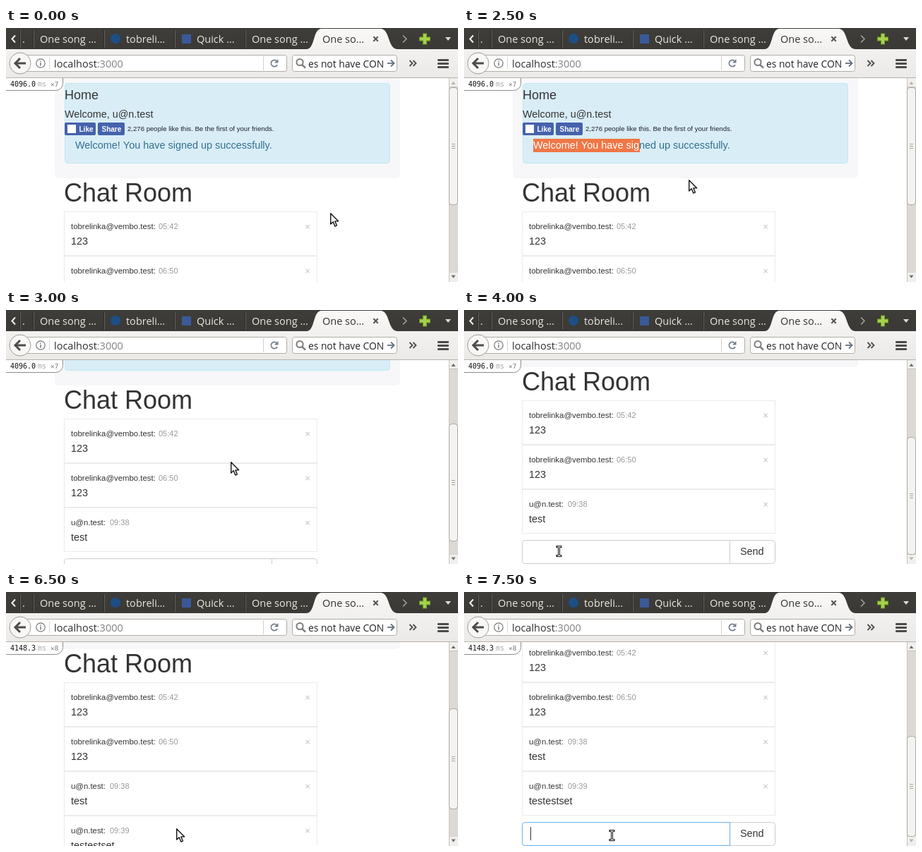
Animation of 640 by 360 pixels, one loop 8 s. Source, as an HTML page with a canvas:

```html
<!DOCTYPE html>
<html lang="en">
<head>
<meta charset="utf-8">
<title>Chat room</title>
<style>
html, body { margin: 0; width: 100%; height: 100%; overflow: hidden; background: #fff; }
canvas { display: block; width: 640px; height: 360px; }
</style>
</head>
<body>
<canvas id="stage" width="640" height="360"></canvas>
<script>
const c = document.getElementById('stage').getContext('2d');
const LOOP = 8000;
const STEP = 250;
const UI = '"Open Sans", "Noto Sans", sans-serif';
const SANS = '"Liberation Sans", Arial, sans-serif';
const MONO = '"DejaVu Sans Mono", monospace';
const USER = 'u@n.test';
const FRIEND = 'tobrelinka@vembo.test';
const DRAFT = 'testestset';
const NOTICE = 'Welcome! You have signed up successfully.';
const MESSAGES = [
  [FRIEND, '05:42', '123'],
  [FRIEND, '06:50', '123'],
  [USER, '09:38', 'test'],
  [USER, '09:39', DRAFT]
];

// Each entry overrides part of the state from its time on.
const TIMELINE = [
  [0, { kind: 'arrow', x: 459, y: 262, scroll: 0, sel: 0, sent: false, focus: false, caret: false, typed: 0, button: '#fff' }],
  [250, { x: 400, y: 235 }],
  [500, { x: 250, y: 170 }],
  [750, { x: 41, y: 93 }],
  [1000, { x: 60, y: 148 }],
  [1250, { kind: 'beam', x: 102, y: 166 }],
  [1500, { x: 249, sel: 151 }],
  [1750, { kind: 'arrow', x: 350, y: 113 }],
  [2250, { x: 335, y: 170 }],
  [2500, { x: 318, y: 215 }],
  [2750, { scroll: 53 }],
  [3000, { scroll: 106 }],
  [3250, { scroll: 132, y: 220 }],
  [3500, { x: 250, y: 268 }],
  [3750, { x: 165, y: 318 }],
  [4000, { kind: 'beam', x: 134, y: 342 }],
  [4250, { focus: true, caret: true }],
  [4500, { typed: 1 }],
  [4750, { typed: 5 }],
  [5000, { typed: 10 }],
  [5250, { x: 300, y: 346 }],
  [5500, { kind: 'hand', x: 396, y: 344, button: '#e6e6e6' }],
  [5750, { focus: false, caret: false, button: '#d4d4d4' }],
  [6000, { kind: 'arrow', x: 391, y: 341, sent: true, typed: 0, button: '#fff' }],
  [6250, { x: 305, y: 338 }],
  [6500, { x: 241, y: 335 }],
  [6750, { scroll: 164 }],
  [7000, { kind: 'beam', x: 236, y: 342, scroll: 195 }],
  [7250, { x: 209, y: 345, focus: true }],
  [7500, { caret: true }]
];

function stateAt(t) {
  return Object.assign({}, ...TIMELINE.filter(k => k[0] <= t).map(k => k[1]));
}

function text(str, x, y, size, color, family = SANS, weight = '') {
  c.font = `${weight} ${size}px ${family}`;
  c.fillStyle = color;
  c.fillText(str, x, y);
}

function box(x, y, w, h, r, fill, stroke) {
  c.beginPath();
  c.roundRect(x, y, w, h, r);
  if (fill) { c.fillStyle = fill; c.fill(); }
  if (stroke) { c.strokeStyle = stroke; c.lineWidth = 1; c.stroke(); }
}

function rect(x, y, w, h, color) {
  c.fillStyle = color;
  c.fillRect(x, y, w, h);
}

function line(points, color, width = 1) {
  c.beginPath();
  points.forEach(([x, y]) => c.lineTo(x, y));
  c.strokeStyle = color;
  c.lineWidth = width;
  c.stroke();
}

function poly(points, fill, stroke, width = 1) {
  c.beginPath();
  points.forEach(([x, y]) => c.lineTo(x, y));
  c.closePath();
  if (fill) { c.fillStyle = fill; c.fill(); }
  if (stroke) { c.strokeStyle = stroke; c.lineWidth = width; c.stroke(); }
}

function disc(x, y, r, fill, stroke, width = 1) {
  c.beginPath();
  c.arc(x, y, r, 0, 7);
  if (fill) { c.fillStyle = fill; c.fill(); }
  if (stroke) { c.strokeStyle = stroke; c.lineWidth = width; c.stroke(); }
}

function cross(x, y, r, color, width) {
  line([[x - r, y - r], [x + r, y + r]], color, width);
  line([[x + r, y - r], [x - r, y + r]], color, width);
}

function vgrad(y0, y1, a, b) {
  const g = c.createLinearGradient(0, y0, 0, y1);
  g.addColorStop(0, a);
  g.addColorStop(1, b);
  return g;
}

function tabs() {
  rect(0, 0, 640, 30, vgrad(0, 30, '#3e3d39', '#3a3935'));
  line([[13, 10.5], [8.5, 15.5], [13, 20.5]], '#f2f1f0', 2);
  [19.5, 38.5, 138.5, 238.5, 338.5].forEach(x => {
    rect(x - 0.5, 3, 1, 25, '#2b2a27');
    rect(x + 0.5, 3, 1, 25, '#64635e');
  });
  const label = (str, x, color = '#ece8e0') => text(str, x, 20.5, 14.5, color, UI);
  label('.', 23);
  label('One song …', 48);
  disc(155, 15, 7, '#1d4f87');
  label('tobreli…', 170);
  rect(249, 9, 13, 13, '#3b5998');
  label('Quick …', 270);
  label('One song …', 348);

  c.beginPath();
  c.moveTo(426, 30);
  c.bezierCurveTo(438, 29, 434, 1, 447, 1);
  c.lineTo(530, 1);
  c.bezierCurveTo(544, 1, 540, 29, 554, 30);
  c.fillStyle = vgrad(1, 30, '#faf9f8', '#f2f1f0');
  c.fill();
  label('One so…', 448, '#333');
  cross(523.5, 15.5, 3.2, '#55534e', 2);

  line([[562, 10.5], [567, 15.5], [562, 20.5]], '#a5a39d', 1.5);
  const plus = (r, h, color) => {
    rect(593 - r, 15.5 - h, 2 * r, 2 * h, color);
    rect(593 - h, 15.5 - r, 2 * h, 2 * r, color);
  };
  plus(8, 3, '#6d9c23');
  plus(7, 2, '#a5d14c');
  poly([[622, 13], [630, 13], [626, 18]], '#dfdbd2');
}

function toolbar() {
  rect(0, 30, 640, 41, vgrad(30, 70, '#f2f1f0', '#eceae8'));
  rect(0, 70, 640, 1, '#b5b1aa');

  box(27.5, 38.5, 370, 23, 3, '#fff', '#b1ada6');
  disc(20, 50, 15, '#f8f7f6', '#9f9b95');
  line([[13, 50], [28, 50]], '#4c4c4c', 3);
  line([[20, 43], [13, 50], [20, 57]], '#4c4c4c', 3);
  disc(49, 50, 6.2, null, '#777', 1.2);
  rect(48.3, 46.5, 1.5, 1.5, '#777');
  rect(48.3, 49, 1.5, 4.5, '#777');
  rect(61, 42, 1, 16, '#d8d6d2');
  text('localhost', 68, 55.5, 14.5, '#2e2e2e', UI);
  text(':3000', 68 + c.measureText('localhost').width, 55.5, 14.5, '#808080', UI);
  rect(364, 40, 1, 20, '#d3d0cc');
  c.beginPath();
  c.arc(380, 50, 4.6, 0.5, 5.4);
  c.strokeStyle = '#737f8b';
  c.lineWidth = 1.8;
  c.stroke();
  poly([[385.5, 44], [385.5, 49.5], [380, 49.5]], '#737f8b');

  box(405.5, 38.5, 148, 23, 3, '#fff', '#b1ada6');
  disc(416, 48.5, 4.6, null, '#7d7d7d', 2);
  line([[419, 52], [424, 56.5]], '#7d7d7d', 2.4);
  c.save();
  c.beginPath();
  c.rect(428, 40, 109, 20);
  c.clip();
  text('es not have CON', 428, 55.5, 13.8, '#222', UI);
  c.restore();
  line([[540, 50], [549, 50]], '#65707b', 1.8);
  line([[545, 45.5], [549.5, 50], [545, 54.5]], '#65707b', 1.8);

  [571.5, 576.5].forEach(x => line([[x, 46], [x + 4, 50], [x, 54]], '#4c4c4c', 1.8));
  [44, 49, 54].forEach(y => box(611, y, 16, 3, 1, '#4c4c4c'));
}

function header(s) {
  box(69, 60, 489, 153, 6, '#f7f7f9');
  box(83.5, 78.5, 460, 113, 4, '#d9edf7', '#bce8f1');
  text('Home', 83, 101, 18, '#333');
  text('Welcome, ' + USER, 83, 127, 14.4, '#333');

  const blue = '#4562ac';
  box(83, 134, 44, 18, 2, blue);
  rect(87, 137, 12, 12, '#fff');
  text('Like', 103.5, 147, 10, '#fff', SANS, 'bold');
  box(130, 134, 38, 18, 2, blue);
  text('Share', 135.5, 147, 10, '#fff', SANS, 'bold');
  text('2,276 people like this. Be the first of your friends.', 172, 146, 9.6, '#1d2129');

  text(NOTICE, 98, 171, 14.43, '#31708f');
  if (s.sel) {
    c.save();
    c.beginPath();
    c.rect(98, 157, s.sel, 19);
    c.clip();
    rect(98, 157, s.sel, 19, '#f07746');
    text(NOTICE, 98, 171, 14.43, '#fff');
    c.restore();
  }
  text('Chat Room', 82, 246, 36, '#333');
}

function message([who, time, body], top) {
  c.strokeStyle = '#ebebeb';
  c.lineWidth = 1;
  c.strokeRect(82.5, top + 0.5, 358, 62);
  text(who + ':', 92, top + 25, 11.4, '#333');
  text(time, who === USER ? 147 : 216, top + 25, 11, '#999');
  text(body, 92, top + 47, 14.4, '#333');
  cross(427, top + 21.5, 2.6, '#c8c8c8', 1.1);
}

function form(s, top) {
  const hot = s.button !== '#fff';
  box(376.5, top + 0.5, 64, 33, [0, 4, 4, 0], s.button, hot ? '#adadad' : '#ccc');
  text('Send', 391, top + 21, 14.4, '#333');
  box(82.5, top + 0.5, 294, 33, [4, 0, 0, 4], '#fff', s.focus ? '#66afe9' : '#ccc');
  const draft = DRAFT.slice(0, s.typed);
  text(draft, 94, top + 21, 14.4, '#555');
  if (s.caret) rect(Math.round(94 + c.measureText(draft).width), top + 7, 1, 19, '#333');
}

function scrollbar(s) {
  rect(627, 71, 13, 289, '#dcd9d5');
  rect(627, 71, 1, 289, '#c6c2bc');
  [71, 347].forEach(y => rect(628, y, 12, 13, '#f0efed'));
  rect(628, 83, 12, 1, '#c4c0b9');
  const size = s.sent ? 143 : 167;
  const max = s.sent ? 195 : 132;
  const arrow = (y, dir, active) =>
    poly([[630.5, y - 2 * dir], [636.5, y - 2 * dir], [633.5, y + 2 * dir]], active ? '#6b6964' : '#b5b2ad');
  arrow(78, -1, s.scroll > 0);
  arrow(352.5, 1, s.scroll < max);
  const top = Math.round(84 + s.scroll / max * (263 - size));
  box(627.5, top + 0.5, 12, size - 1, 4, '#f4f3f2', '#aaa59d');
  const mid = top + Math.floor(size / 2);
  [-3, 0, 3].forEach(d => rect(631, mid + d, 5, 1, '#a5a098'));
}

function badge(s) {
  box(-1.5, 60.5, 82, 28, [0, 0, 10, 0], '#fff', '#8c8c8c');
  text(s.sent ? '4148.3' : '4096.0', 6, 83, 10, '#111', MONO);
  text('ms', 45, 83, 10, '#aaa', MONO);
  text(s.sent ? '×8' : '×7', 63, 83, 9.4, '#777', MONO);
}

function pointer({ kind, x, y }) {
  c.save();
  c.translate(x, y);
  c.lineJoin = 'round';
  if (kind === 'arrow') {
    poly([[0.7, 0.8], [0.7, 16], [4.2, 12.8], [6.8, 19], [9.4, 17.9], [6.9, 11.9], [11.6, 11.7]], '#fff', '#111', 1.4);
  } else if (kind === 'beam') {
    c.lineCap = 'square';
    [['#111', 3], ['#fff', 1]].forEach(([color, w]) => {
      line([[-2, -6.5], [3, -6.5]], color, w);
      line([[0.5, -6.5], [0.5, 6.5]], color, w);
      line([[-2, 6.5], [3, 6.5]], color, w);
    });
  } else {
    poly([[-1.5, 0.5], [1, 0.5], [1.5, 5.5], [4, 5], [6.5, 6], [9, 7], [9, 11], [7.5, 15],
      [-1, 15], [-5.5, 9.5], [-4.5, 7.8], [-1.5, 9.5]], '#fff', '#111', 1.3);
    [1.5, 4, 6.5].forEach(d => line([[d, 6], [d, 9]], '#111'));
  }
  c.restore();
}

function draw(t) {
  const s = stateAt(t);
  rect(0, 0, 640, 360, '#fff');
  c.save();
  c.translate(0, -s.scroll);
  header(s);
  const list = MESSAGES.slice(0, s.sent ? 4 : 3);
  list.forEach((m, i) => message(m, 260 + 63 * i));
  form(s, 269 + 63 * list.length);
  c.restore();
  scrollbar(s);
  badge(s);
  toolbar();
  tabs();
  pointer(s);
}

const start = performance.now();
function tick() {
  const t = (performance.now() - start) % LOOP;
  draw(Math.floor(t / STEP) * STEP);
  requestAnimationFrame(tick);
}
tick();
</script>
</body>
</html>
```
